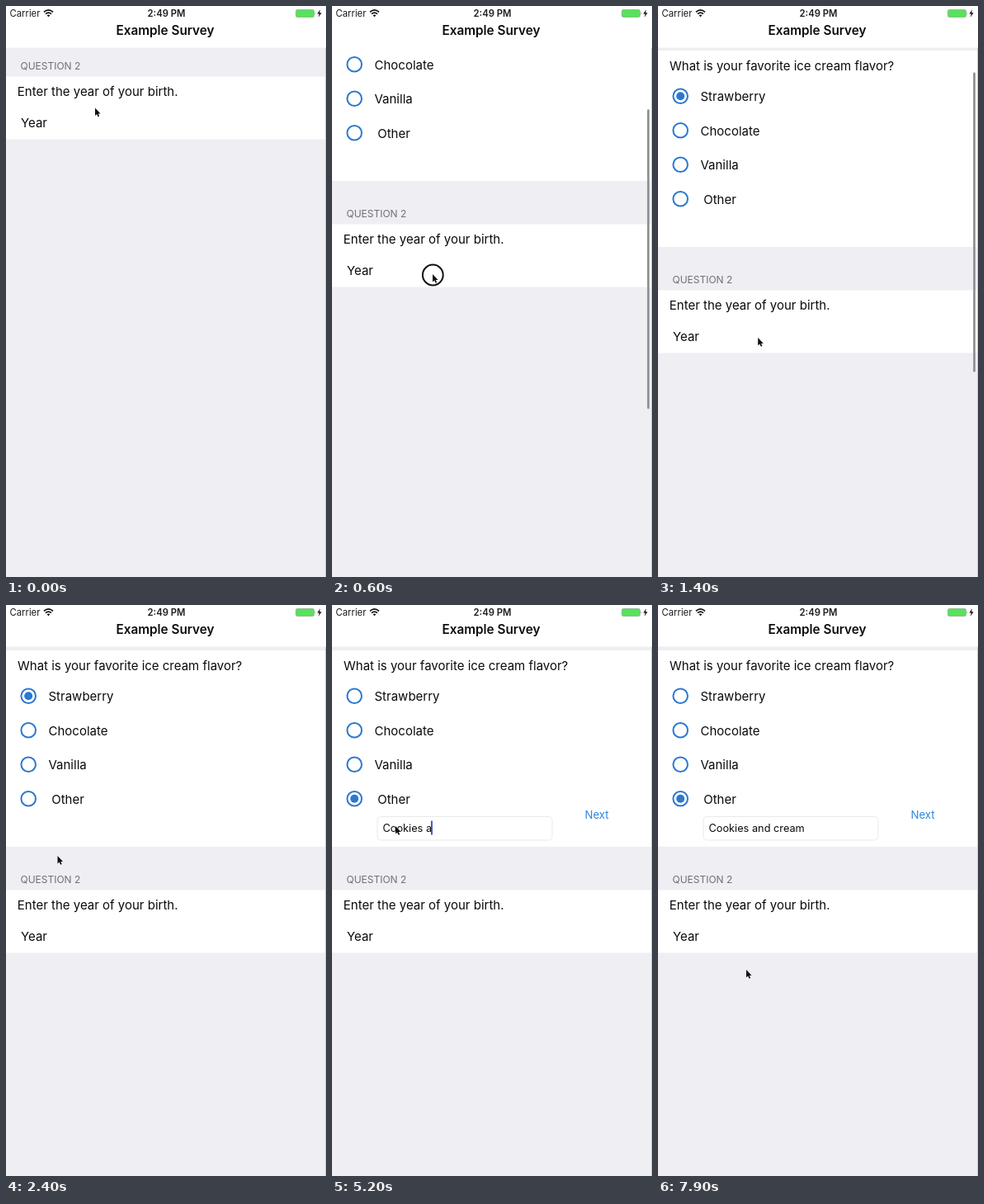
Animation of 388 by 692 pixels, one loop 8000 ms. Source, as an HTML page:

```html
<!DOCTYPE html>
<html lang="en">
<head>
<meta charset="utf-8">
<title>Example Survey</title>
<style>
  html, body { margin: 0; width: 100%; height: 100%; overflow: hidden; background: #efeef3; }
  svg { display: block; width: 388px; height: 692px; }
  text { font: 15px Inter, "Open Sans", sans-serif; fill: #0b0b0b; white-space: pre; }
  .label { font-size: 12px; fill: #707075; }
  .small { font-size: 12.75px; }
  .status { font-size: 11.3px; fill: #1c1c1c; }
  .bold { font-weight: 600; }
  .hint { fill: #c8c8cc; }
  .link { font-size: 13.2px; fill: #2b86e0; }
  .ring { fill: #fff; stroke: #2b78cf; stroke-width: 2; }
  .dot { fill: #2b78cf; }
</style>
</head>
<body>
<svg viewBox="0 0 388 692">
  <rect width="388" height="692" fill="#efeef3"/>
  <g id="page">
    <rect y="55" width="388" height="238" fill="#fff"/>
    <rect y="345.5" width="388" height="76" fill="#fff"/>
    <text x="14" y="78.5">What is your favorite ice cream flavor?</text>
    <g id="options"></g>
    <g id="extra">
      <rect x="55" y="256.5" width="212" height="28.5" rx="4.5" fill="#fff" stroke="#e9e9eb"/>
      <text id="hint" class="small hint" x="62" y="275">Please specify</text>
      <text id="entry" class="small" x="61.5" y="275"></text>
      <rect id="caret" y="261.5" width="2" height="17" fill="#4257c9"/>
      <text class="link" x="306.5" y="258.5">Next</text>
    </g>
    <text class="label" x="17.5" y="336.5">QUESTION 2</text>
    <text x="13.8" y="368.7">Enter the year of your birth.</text>
    <text x="18" y="406.8">Year</text>
  </g>
  <rect x="387" y="50" width="1" height="642" fill="#d3d3d8"/>
  <rect id="bar" x="382.2" width="2.6" height="363" rx="1.3" fill="#8b8b90"/>

  <rect width="388" height="50.5" fill="#fff"/>
  <text class="status" x="4.5" y="13.2">Carrier</text>
  <g fill="none" stroke="#111" stroke-width="1.7">
    <path d="M46 7.3Q51.5 2.6 57 7.3"/>
    <path d="M48 9.6Q51.5 6.6 55 9.6"/>
  </g>
  <path d="M49.6 11.2Q51.5 9.8 53.4 11.2L51.5 13.2Z" fill="#111"/>
  <text class="status bold" x="194.5" y="13.2" text-anchor="middle">2:49 PM</text>
  <rect x="351.5" y="4.5" width="22" height="9" rx="1.8" fill="#57e25c" stroke="#8fae90" stroke-width=".8"/>
  <path d="M374.6 7.3q1.4 1.7 0 3.4z" fill="#777"/>
  <path d="M381 4.2L377.4 9.6H379.8L378.8 13.8L382.6 8.2H380.2Z" fill="#111"/>
  <text class="bold" style="font-size:15.3px" x="193" y="35.4" text-anchor="middle">Example Survey</text>

  <g id="pointer">
    <circle id="touch" cx=".3" cy="1" r="12.4" fill="none" stroke="#111" stroke-width="2"/>
    <path d="M0 0V9.4L2.1 7.5L3.6 10.8L5.2 10L3.8 6.9H6.6Z" fill="#111" stroke="#fff" stroke-opacity=".7" stroke-width=".7" paint-order="stroke"/>
  </g>
</svg>
<script>
const LOOP = 8000, STEP = 100;
const PHRASE = "Cookies and cream";
const $ = id => document.getElementById(id);

// tables of [time, value...]
const SCROLL = [[200, -260], [300, -236], [400, -185], [500, -128], [600, -81], [700, -55], [800, -38],
  [900, -26], [1000, -17.5], [1100, -11], [1200, -6], [1300, -3], [1400, -1], [1500, 0]];
const POINTER = [[0, 108, 123.5], [100, 108, 123.5], [200, 112, 146], [300, 115, 171], [400, 118, 222],
  [500, 120, 279], [600, 122, 325], [700, 122, 351], [800, 122, 368], [900, 122, 380], [1000, 122, 389],
  [1300, 122, 403], [1800, 118, 398], [2100, 92, 350], [2400, 62.5, 304], [2600, 62.5, 304],
  [2900, 66, 237], [3500, 66, 237], [3700, 77, 268], [6700, 77, 268], [7000, 150, 325],
  [7200, 228, 366], [7400, 178, 384], [7600, 115, 398], [7800, 107, 442]];
const BAR = [[100, 0], [300, 1], [1900, 1], [2300, 0]];
const EXTRA = [[3000, 0], [3300, 1]];
const TYPED = [[0, 0], [4200, 1], [4400, 2], [4500, 3], [4700, 4], [4900, 5], [5000, 7], [5200, 9],
  [5300, 10], [5500, 11], [5600, 12], [5800, 13], [6000, 14], [6100, 15], [6200, 16], [6300, 17]];
const TOUCHES = [[200, 1300], [3000, 3200], [3700, 3800], [7700, 7900]];

const within = (t, [a, b]) => t >= a && t < b;

function blend(table, t, col = 1) {
  const i = table.findIndex(row => row[0] > t);
  if (i === 0) return table[0][col];
  if (i < 0) return table[table.length - 1][col];
  const a = table[i - 1], b = table[i];
  return a[col] + (b[col] - a[col]) * (t - a[0]) / (b[0] - a[0]);
}

const hold = (table, t) => table.filter(row => row[0] <= t).pop()[1];

$("options").innerHTML = ["Strawberry", "Chocolate", "Vanilla", "Other"].map((name, i) => {
  const y = 110.2 + i * 41.5;
  return `<circle class="ring" cx="27.2" cy="${y}" r="8.8"/><circle class="dot" cx="27.2" cy="${y}" r="5"/>
    <text x="${i === 3 ? 55.2 : 51.5}" y="${y + 6.2}">${name}</text>`;
}).join("");
const dots = document.querySelectorAll(".dot");

function draw(t) {
  const scroll = blend(SCROLL, t);
  $("page").setAttribute("transform", `translate(0 ${scroll})`);
  $("bar").setAttribute("y", 80 - scroll * 0.56);
  $("bar").style.opacity = blend(BAR, t);

  const picked = t < 3000 ? 0 : 3;
  dots.forEach((dot, i) => dot.style.opacity = +(i === picked));

  $("extra").style.opacity = blend(EXTRA, t);
  const count = hold(TYPED, t);
  $("entry").textContent = PHRASE.slice(0, count);
  $("hint").style.opacity = +(count === 0);
  $("caret").setAttribute("x", 61.3 + (count ? $("entry").getComputedTextLength() - 1 : 0));
  $("caret").style.opacity = +within(t, [3700, 7800]);

  $("pointer").setAttribute("transform", `translate(${blend(POINTER, t)} ${blend(POINTER, t, 2)})`);
  $("touch").style.opacity = +TOUCHES.some(span => within(t, span));
}

const start = performance.now();
function tick() {
  const t = (performance.now() - start) % LOOP;
  draw(Math.floor(t / STEP) * STEP);
  requestAnimationFrame(tick);
}
tick();
</script>
</body>
</html>
```
